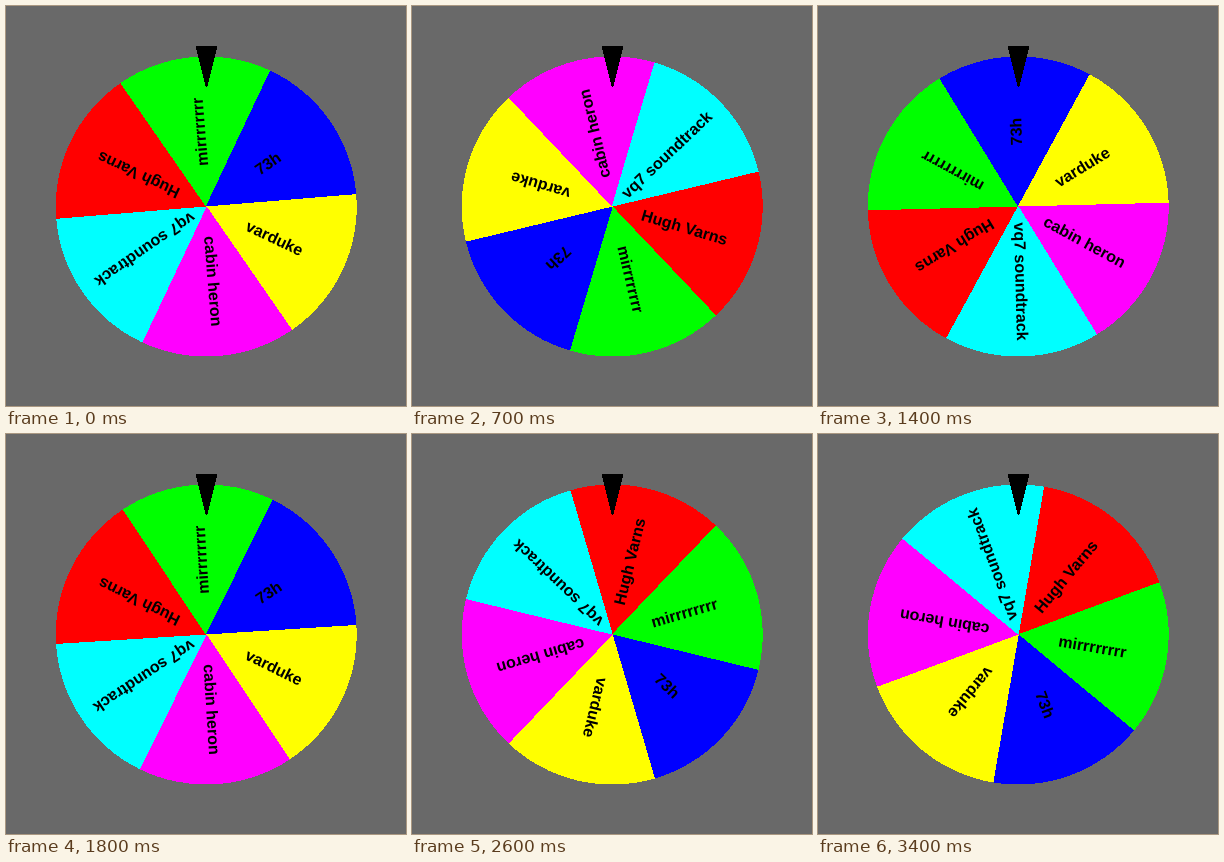
These frames come from a looping animation (400 px wide and 400 px high, 3.9 s). An HTML page:

```html
<!DOCTYPE html>
<html lang="en">
<head>
<meta charset="utf-8">
<title>Spinning wheel</title>
<style>
  html, body { margin: 0; width: 100%; height: 100%; overflow: hidden; background: #696969; }
  svg { display: block; width: 400px; height: 400px; }
  path { shape-rendering: crispEdges; }
  text { font: bold 16px "Liberation Sans", Arial, sans-serif; text-anchor: middle; }
</style>
</head>
<body>
<svg viewBox="0 0 400 400">
  <g id="wheel"></g>
  <path d="M189.5 40H211.5L201.25 81H199.75Z"/>
</svg>
<script>
  const CENTER = 200.5, RADIUS = 150, SLICE = 60, FIRST_MID = -154.7;
  const EDGES = [-0.75, 0.25]; // each slice overlaps its neighbours sideways by a pixel
  const STEP = 50, LAST_STEP = 68, LOOP = 3900;
  const SPEED = 13.63, DRAG = 0.1; // degrees per step, per step squared

  const slices = [
    ['#f00', 'Hugh Varns'],
    ['#0f0', 'mirrrrrrrr'],
    ['#00f', '73h'],
    ['#ff0', 'varduke'],
    ['#f0f', 'cabin heron'],
    ['#0ff', 'vq7 soundtrack']
  ];

  const wheel = document.getElementById('wheel');
  const parts = [];

  function add(tag, mid, dx, attrs, content = '') {
    const el = document.createElementNS('http://www.w3.org/2000/svg', tag);
    for (const key in attrs) el.setAttribute(key, attrs[key]);
    el.textContent = content;
    wheel.append(el);
    parts.push({ el, mid, x: CENTER + dx });
  }

  const half = SLICE / 2 * Math.PI / 180;
  const x = RADIUS * Math.cos(half), y = RADIUS * Math.sin(half);
  const d = `M0 0L${x} ${-y}A${RADIUS} ${RADIUS} 0 0 1 ${x} ${y}Z`;
  const mid = i => FIRST_MID + i * SLICE;

  slices.forEach(([fill], i) => EDGES.forEach(dx => add('path', mid(i), dx, { fill, d })));
  slices.forEach(([, label], i) => add('text', mid(i), 0, { x: RADIUS / 2, y: 5 }, label));

  const start = performance.now();

  function draw() {
    const time = (performance.now() - start) % LOOP;
    const n = Math.min(LAST_STEP, Math.floor(time / STEP));
    const turn = SPEED * n - DRAG * n * n;
    for (const p of parts) {
      p.el.setAttribute('transform', `translate(${p.x} ${CENTER}) rotate(${turn + p.mid})`);
    }
    requestAnimationFrame(draw);
  }
  draw();
</script>
</body>
</html>
```
